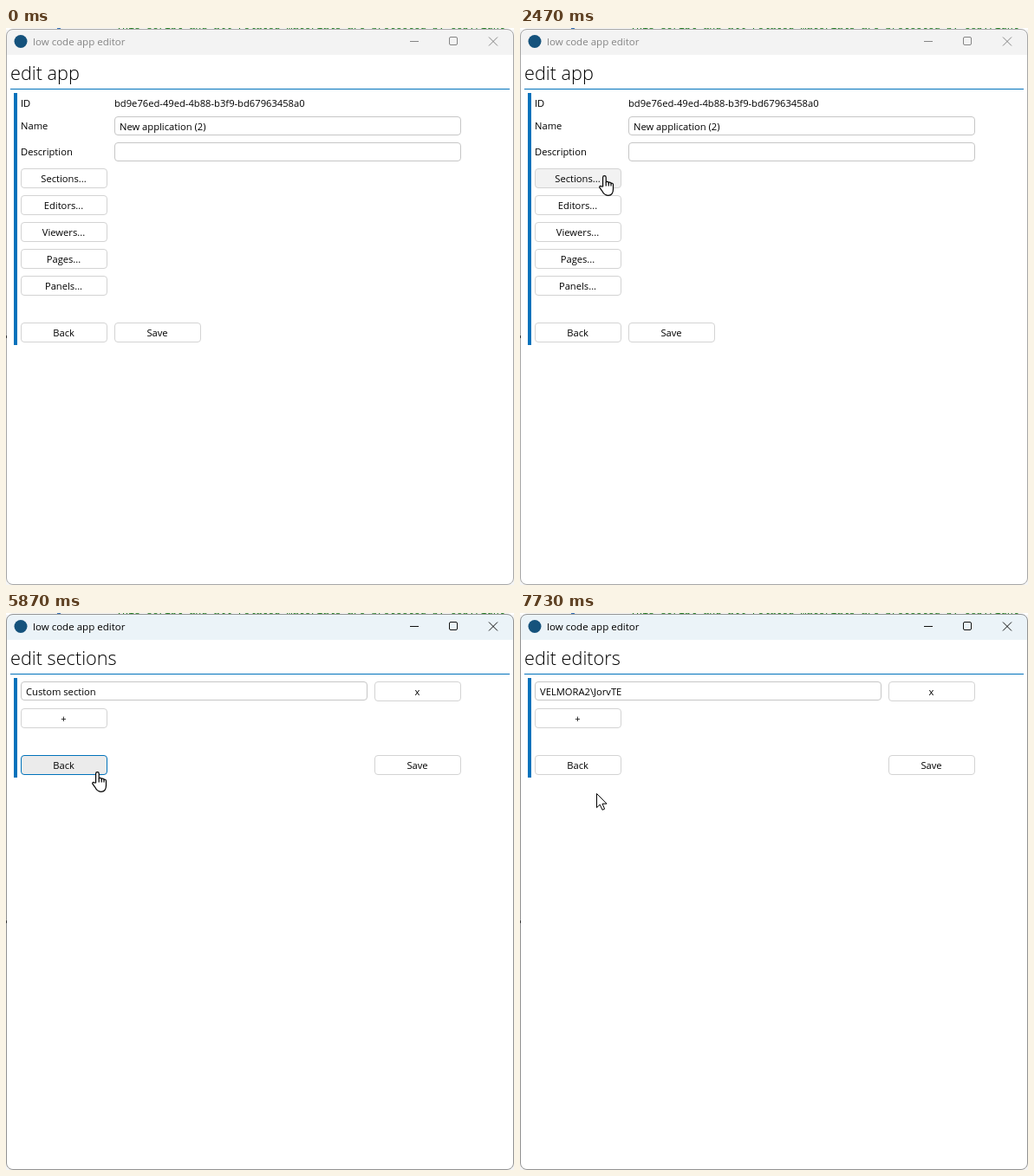
An HTML page that plays this animation: 586x643 px, repeating every 8 s.

```html
<!DOCTYPE html>
<html lang="en">
<head>
<meta charset="utf-8">
<title>low code app editor</title>
<style>
  html, body { margin: 0; width: 100%; height: 100%; overflow: hidden; background: #f4f4f4; }
  svg { display: block; width: 586px; height: 643px; }
  text { font: 11.2px "Open Sans", "Noto Sans", sans-serif; fill: #000; white-space: pre; }
  .caption { font-size: 11.55px; fill: #858585; }
  .heading { font-size: 21.7px; font-weight: 300; }
  .code { font: 11.7px "Liberation Mono", monospace; fill: #107510; }
  .center { text-anchor: middle; }
  .bar { fill: #f3f3f3; }
  .frame { fill: none; stroke: #a6a6a6; }
  .system { fill: none; stroke: #858585; }
  .active .caption { fill: #000; }
  .active .bar { fill: #ebf3f8; }
  .active .frame { stroke: #929292; }
  .active .system { stroke: #111; }
  .accent { fill: #0072bb; }
  .control rect { fill: #fff; stroke: #d3d3d3; }
  .field rect { stroke: #c6c6c6; }
  .field.hover rect { stroke: #0072bb; }
  .button.hover rect { fill: #f2f2f2; }
  .button.pressed rect { fill: #ebebeb; stroke: #0072bb; }
  .glyph { fill: #fff; stroke: #000; stroke-linejoin: round; }
  [hidden] { display: none; }
</style>
</head>
<body>
<svg viewBox="0 0 586 643" id="stage">
  <clipPath id="outline"><rect x="0" y="1" width="586" height="642" rx="8"/></clipPath>
  <rect width="586" height="2" fill="#fff"/>
  <text class="code" x="127" y="1">This script and all related materials are protected by copyright</text>
  <rect x="59" width="4" height="1" fill="#3a78c0"/>
  <g clip-path="url(#outline)">
    <rect y="1" width="586" height="642" fill="#fff"/>
    <rect class="bar" y="1" width="586" height="30"/>
  </g>
  <rect class="frame" x=".5" y="1.5" width="585" height="641" rx="7.5"/>
  <rect y="355" width="1" height="3" fill="#333"/>
  <circle cx="17" cy="15.5" r="7.5" fill="#15527c"/>
  <text class="caption" x="31" y="20">low code app editor</text>
  <g class="system">
    <path d="M466 15.5h10M557 10.5l10 10m0-10l-10 10"/>
    <rect x="511.5" y="10.5" width="9" height="9" rx="1.5"/>
  </g>
  <rect class="accent" x="5" y="70" width="576" height="1"/>
  <g id="pages"></g>
  <g id="cursor" hidden>
    <path class="glyph" id="arrow" d="M.5 .5V16.7L4.2 13.2 7 19.3 9.6 18.2 7 12.2H12Z"/>
    <g class="glyph" id="hand" transform="translate(-6 0)" stroke-width="1.2">
      <path d="M4.6 13V2.4a1.8 1.8 0 0 1 3.6 0V8.5c0-1.6 3-1.6 3 .4c.2-1.2 2.8-1 2.8 .8c.4-1 2.5-.6 2.5 1V16c0 4-2 7.3-6 7.3c-4 0-5.5-2.5-7-5.5L.8 14.2c-.6-1.4 1.2-2.4 2.2-1.2Z"/>
      <path d="M8.2 8.5v4M11.2 9v3.5M14 9.8v2.7"/>
    </g>
    <g id="beam" fill="none">
      <path stroke="#fff" stroke-width="3" d="M.5-7V7"/>
      <path stroke="#000" d="M-3-7.5h2.5l1 1 1-1H4M.5-6.5v13M-3 7.5h2.5l1-1 1 1H4"/>
    </g>
  </g>
</svg>
<script>
const LOOP = 8000, TICK = 1000 / 15;
const byId = id => document.getElementById(id);
const stage = byId('stage'), cursor = byId('cursor');
const glyphs = ['arrow', 'hand', 'beam'];

const label = (x, y, text, cls = '') => `<text class="${cls}" x="${x}" y="${y}">${text}</text>`;

function control(kind, x, y, w, h, inner) {
  return `<g class="control ${kind}" data-box="${x},${y},${w},${h}">
    <rect x="${x + .5}" y="${y + .5}" width="${w - 1}" height="${h - 1}" rx="3.5"/>${inner}</g>`;
}
const button = (x, y, text) =>
  control('button', x, y, 100, 23, label(x + 49.5, y + 16, text, 'center'));
const field = (x, y, text) =>
  control('field', x, y, 400, 22, label(x + 6, y + 16, text));
const page = (id, title, height, body) => `<g id="${id}">
  ${label(5, 60, title, 'heading')}
  <rect class="accent" x="9" y="75" width="4" height="${height}"/>${body}</g>`;
const listPage = (id, title, item) => page(id, title, 115,
  field(17, 79, item) + button(425, 79, 'x') + button(17, 110, '+') +
  button(17, 164, 'Back') + button(425, 164, 'Save'));

byId('pages').innerHTML =
  page('app', 'edit app', 291,
    label(17, 91, 'ID') + label(125, 91, 'bd9e76ed-49ed-4b88-b3f9-bd67963458a0') +
    label(17, 117, 'Name') + field(125, 102, 'New application (2)') +
    label(17, 147, 'Description') + field(125, 132, '') +
    ['Sections', 'Editors', 'Viewers', 'Pages', 'Panels']
      .map((name, i) => button(17, 162 + 31 * i, name + '...')).join('') +
    button(17, 340, 'Back') + button(125, 340, 'Save')) +
  listPage('sections', 'edit sections', 'Custom section') +
  listPage('editors', 'edit editors', 'VELMORA2\\JorvTE');

const controls = [...document.querySelectorAll('.control')].map(el => ({
  el, page: el.parentNode.id, box: el.dataset.box.split(',').map(Number)
}));

// All times below are in ticks; hover only reacts once a new page has settled.
const visits = [
  { id: 'app', from: 0, settled: 0 },
  { id: 'sections', from: 43, settled: 44 },
  { id: 'app', from: 91, settled: 93 },
  { id: 'editors', from: 115, settled: 116 }
];
const presses = [[40, 43], [88, 91], [113, 115]];
const ACTIVATED = 40, CURSOR_SHOWN = 16;
const path = [
  [16, 300, 301], [27, 245, 124], [28, 243, 118], [29, 243, 118],
  [37, 97, 170], [51, 97, 170], [58, 140, 98], [64, 158, 99],
  [70, 105, 183], [98, 105, 183], [101, 88, 208]
];

function cursorAt(tick) {
  const next = path.findIndex(p => p[0] >= tick);
  if (next < 0) return path[path.length - 1].slice(1);
  if (next === 0) return path[0].slice(1);
  const [t0, x0, y0] = path[next - 1], [t1, x1, y1] = path[next];
  const u = (tick - t0) / (t1 - t0), e = u * u * (3 - 2 * u);
  return [Math.round(x0 + (x1 - x0) * e), Math.round(y0 + (y1 - y0) * e)];
}

const contains = ([bx, by, w, h], x, y) => x >= bx && x < bx + w && y >= by && y < by + h;

function render(tick) {
  const visit = visits.filter(v => v.from <= tick).pop();
  const shown = tick >= CURSOR_SHOWN, settled = tick >= visit.settled;
  const pressed = presses.some(([a, b]) => tick >= a && tick < b);
  const [x, y] = cursorAt(tick);
  const target = shown && settled &&
    controls.find(c => c.page === visit.id && contains(c.box, x, y));

  stage.classList.toggle('active', tick >= ACTIVATED);
  for (const { id } of visits) byId(id).toggleAttribute('hidden', id !== visit.id);
  for (const c of controls) {
    c.el.classList.toggle('hover', c === target);
    c.el.classList.toggle('pressed', c === target && pressed);
  }

  let glyph = settled ? 'arrow' : 'hand';
  if (target) glyph = target.el.classList.contains('field') ? 'beam' : 'hand';
  for (const id of glyphs) byId(id).toggleAttribute('hidden', id !== glyph);
  cursor.toggleAttribute('hidden', !shown);
  cursor.setAttribute('transform', `translate(${x} ${y})`);
}

let last = -1;
function frame() {
  const tick = Math.floor((performance.now() % LOOP + 4) / TICK);
  if (tick !== last) render(last = tick);
  requestAnimationFrame(frame);
}
frame();
</script>
</body>
</html>
```
